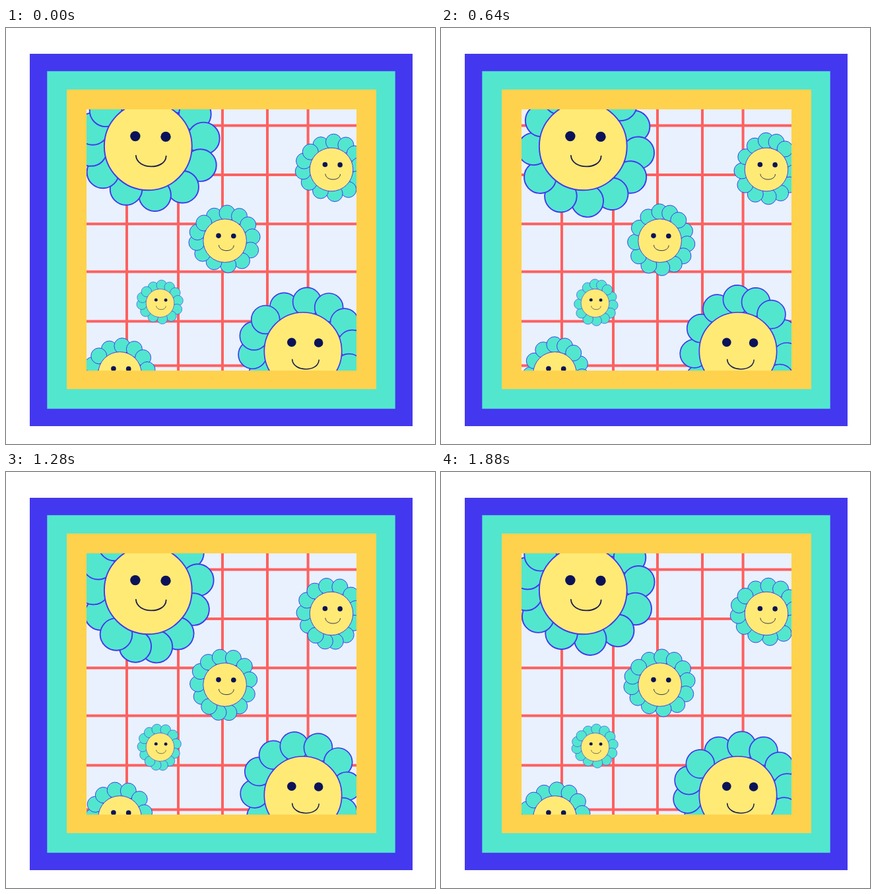
Write an HTML page that moves like this. It is 650 by 629 pixels and loops after 1920 ms.

```html
<!DOCTYPE html>
<html lang="en">
<head>
<meta charset="utf-8">
<title>Spinning flowers</title>
<style>
  html, body { margin: 0; width: 100%; height: 100%; overflow: hidden; background: #fff; }
  svg { display: block; width: 100%; height: 100%; }
  .petal { fill: #52e6cf; stroke: #4338ef; stroke-width: .95; }
  .face { fill: #ffea75; stroke: #4338ef; stroke-width: .95; }
  .eye { fill: #0b1259; }
  .smile { fill: none; stroke: #1a1a55; stroke-width: .9; stroke-linecap: round; }
  .grid { fill: none; stroke: #ff6060; stroke-width: 4; }
</style>
</head>
<body>
<svg id="stage" viewBox="0 0 650 629">
  <clipPath id="window"><rect x="122" y="123" width="409" height="395"/></clipPath>
  <rect x="36" y="39" width="580" height="563" fill="#4338ef"/>
  <rect x="62.3" y="65.3" width="527.4" height="510.4" fill="#52e6cf"/>
  <rect x="92" y="93" width="469" height="453" fill="#ffd24d"/>
  <g id="scene" clip-path="url(#window)">
    <rect x="122" y="123" width="409" height="395" fill="#e9f1ff"/>
  </g>
</svg>
<script>
const LOOP = 1920, STEP = 40, PETALS = 13;
const HUB = [0.3, -0.6];
const scene = document.getElementById('scene');

function add(parent, tag, attrs) {
  const el = document.createElementNS('http://www.w3.org/2000/svg', tag);
  for (const name in attrs) el.setAttribute(name, attrs[name]);
  parent.appendChild(el);
  return el;
}

function circle(parent, cls, cx, cy, r) {
  add(parent, 'circle', { class: cls, cx, cy, r });
}

// An even ring, made uneven by a few slow waves in angle and distance.
function petalAt(i) {
  const a = 2 * Math.PI * i / PETALS;
  const wave = (size, n, phase) => size * Math.cos(n * a - phase);
  const deg = 248.6 + 360 * i / PETALS
    + wave(7.43, 1, -1.65) + wave(3.67, 2, 2.32) + wave(1.27, 3, 1.11);
  const dist = 40.8 + wave(1.62, 1, 0.355) + wave(1.91, 2, -2.33) + wave(1.2, 3, 2.32);
  const rad = deg * Math.PI / 180;
  return [dist * Math.cos(rad), dist * Math.sin(rad)];
}

function addFlower(x, y, scale) {
  const flower = add(scene, 'g', { transform: `translate(${x} ${y}) scale(${scale})` });
  const ring = add(flower, 'g', {});
  for (let i = 0; i < PETALS; i++) circle(ring, 'petal', ...petalAt(i), 12);
  circle(flower, 'face', 0, 0, 32.8);
  circle(flower, 'eye', -9.6, -7.5, 3.8);
  circle(flower, 'eye', 13.2, -7.1, 3.8);
  add(flower, 'path', { class: 'smile', d: 'M-9.1 7C-8.4 17.6 13 17.9 13.5 7.4' });
  return ring;
}

const columns = [183, 261, 328, 396, 457.6].map(x => `M${x} 123V518`);
const rows = [147.5, 222, 296.2, 368.5, 443.5, 510.6].map(y => `M122 ${y}H531`);
add(scene, 'path', { class: 'grid', d: columns.concat(rows).join('') });

const rings = [
  addFlower(215.3, 178.8, 2.025),
  addFlower(493, 214, 1),
  addFlower(331.6, 321.6, 1),
  addFlower(233.5, 416, 0.65),
  addFlower(172.5, 522.5, 1),
  addFlower(450, 488.7, 1.79)
];

function draw(now) {
  const p = Math.floor(now % LOOP / STEP) * STEP / LOOP;
  const turn = 360 * p * p * (3 - 2 * p);
  for (const ring of rings) {
    ring.setAttribute('transform', `translate(${HUB}) rotate(${turn})`);
  }
}

const start = performance.now();
function tick() {
  draw(performance.now() - start);
  requestAnimationFrame(tick);
}
tick();
</script>
</body>
</html>
```
